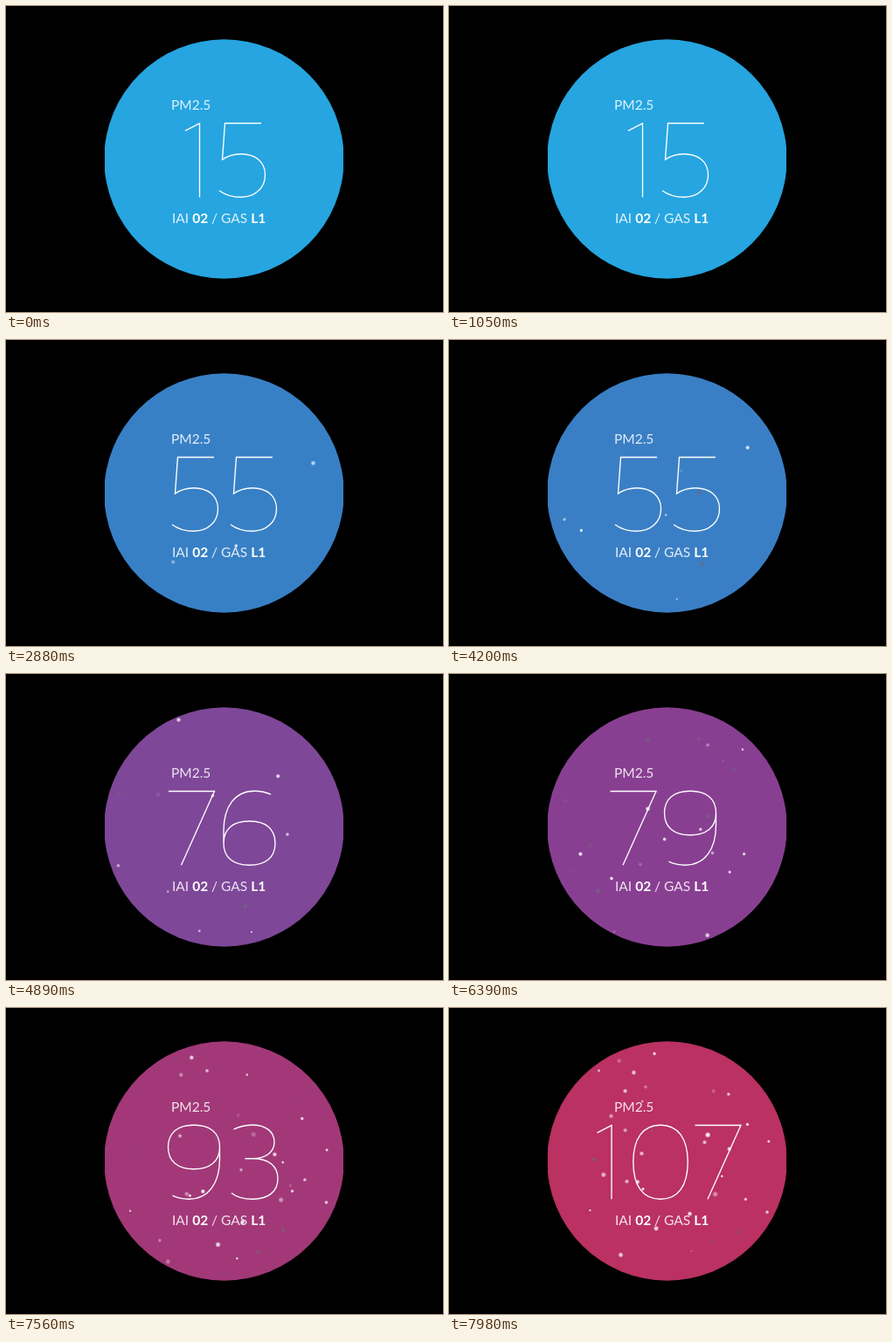
An HTML page with a canvas that plays this animation: 500x351 px, repeating every 8000 ms.

```html
<!DOCTYPE html>
<html lang="en">
<head>
<meta charset="utf-8">
<title>Air quality</title>
<style>
  html, body { margin: 0; width: 100%; height: 100%; overflow: hidden; background: #000; }
  svg, canvas { position: absolute; left: 0; top: 0; width: 500px; height: 351px; }
  text { font: 400 15.5px Lato, "Open Sans", sans-serif; fill: #fff; fill-opacity: .85; }
  .bold { font-weight: 700; fill-opacity: 1; }
  .digits { fill: none; stroke: #fff; stroke-width: 1.35; }
</style>
</head>
<body>
<svg viewBox="0 0 500 351">
  <clipPath id="sides"><rect x="113" y="38" width="273" height="275"/></clipPath>
  <circle id="disc" cx="249.5" cy="175.5" r="137.2" clip-path="url(#sides)"/>
  <text x="189" y="119.3">PM2.5</text>
  <text x="190" y="248.5">IAI <tspan class="bold">02</tspan> / GAS <tspan class="bold">L1</tspan></text>
  <g class="digits" id="reading" role="img">
    <g id="ghost" stroke-opacity=".4"></g>
    <g id="number"></g>
  </g>
</svg>
<canvas width="500" height="351"></canvas>
<script>
const LOOP = 8000;
const $ = id => document.getElementById(id);
const ctx = document.querySelector('canvas').getContext('2d');
const clamp = x => Math.min(1, Math.max(0, x));
const mix = (a, b, k) => a + (b - a) * k;
const noise = n => { const v = Math.sin(n * 127.1) * 43758.5453; return v - Math.floor(v); };

function oval(cx, cy, rx, ry) {
  const hx = rx * .63, hy = ry * .65;
  return `M${cx} ${cy - ry}c${hx} 0 ${rx} ${ry - hy} ${rx} ${ry}s${hx - rx} ${ry} ${-rx} ${ry}` +
    `s${-rx} ${hy - ry} ${-rx} ${-ry}s${rx - hx} ${-ry} ${rx} ${-ry}z`;
}

// Hairline numerals, 85 units tall.
const six = 'M59 4C53 1 46 0 40 0C18 0 5 18 5 46V60' + oval(34.5, 59.75, 29.5, 25.25);
const glyphs = [
  { width: 80, d: oval(40.5, 42.5, 31.2, 42.5) },
  { width: 41, d: 'M9 9L25.5 .5V85' },
  { width: 64, d: 'M7 8C14 2 21 0 29 0C43 0 52 9 52 22C52 33 47 40 36 52L7 84.5H56' },
  { width: 64, d: 'M6 5C13 1.5 20 0 28 0C43 0 52.5 8 52.5 19.5S43 38.5 28 38.5H19H28C46 38.5 56.5 47 56.5 61.5S46 85 28 85C18 85 9 82.5 3.5 78' },
  { width: 70, d: 'M46 85V0L5 62H64' },
  { width: 67, d: 'M55 .3H13.5L10.5 42C17 37.5 24 35.5 32 35.5C48 35.5 59.5 44.5 59.5 59.5S48 85 32 85C22 85 13 82 7 77.5' },
  { width: 70, d: six },
  { width: 58, d: 'M0 .3H52.5L14.5 85' },
  { width: 69, d: oval(33.8, 19.75, 25.5, 19.75) + oval(34, 62.25, 30, 22.75) },
  { width: 73, d: six, turn: 'translate(68 85) rotate(180)' },
];

const counts = [
  { start: 1250, end: 2430, from: 15, to: 55 },
  { start: 4110, end: 5123, from: 55, to: 79 },
  { start: 7110, end: 7980, from: 79, to: 107 },
];

const scale = [
  { level: 15, rgb: [38, 165, 224] },
  { level: 37, rgb: [43, 155, 221] },
  { level: 55, rgb: [56, 128, 198] },
  { level: 79, rgb: [136, 63, 145] },
  { level: 107, rgb: [186, 49, 98] },
];

function valueAt(t) {
  const { start, end, from, to } = counts.findLast(c => t >= c.start) ?? counts[0];
  const k = clamp((t - start) / (end - start));
  return mix(from, to, (1 - Math.cos(Math.PI * k)) / 2);
}

function tintAt(value) {
  const i = Math.max(1, scale.findIndex(s => s.level >= value - 1e-6));
  const a = scale[i - 1], b = scale[i];
  const k = clamp((value - a.level) / (b.level - a.level));
  return `rgb(${a.rgb.map((c, j) => Math.round(mix(c, b.rgb[j], k)))})`;
}

function showNumber(n, sliding) {
  const digits = [...String(n)].map(d => glyphs[d]);
  let pen = 0;
  const strokes = digits.map(({ width, d, turn = '' }) => {
    const path = `<path d="${d}" transform="translate(${pen}) ${turn}"/>`;
    pen += width;
    return path;
  }).join('');
  const place = (layer, left, markup) => {
    layer.innerHTML = markup;
    layer.setAttribute('transform', `translate(${left} 134.2)`);
  };
  const left = 250 - pen / 2;
  place($('number'), sliding ? left - 5 : left, strokes);
  place($('ghost'), left + 1, sliding ? strokes : '');
  $('number').setAttribute('stroke-opacity', sliding ? .8 : 1);
  $('reading').setAttribute('aria-label', n);
}

function speck(x, y, r, color, alpha) {
  const glow = ctx.createRadialGradient(x, y, 0, x, y, r * 1.35);
  glow.addColorStop(0, `rgba(${color},${alpha})`);
  glow.addColorStop(.5, `rgba(${color},${alpha * .85})`);
  glow.addColorStop(1, `rgba(${color},0)`);
  ctx.fillStyle = glow;
  ctx.fillRect(x - 5, y - 5, 10, 10);
}

// Specks are born ever faster, drift straight and fade out.
const LIFE = 1600;
const specks = Array.from({ length: 75 }, (_, i) => {
  const rand = k => noise(i * 7 + k + 1);
  const place = rand(0) * 2 * Math.PI, radius = 132 * Math.sqrt(rand(1));
  const heading = rand(2) * 2 * Math.PI, speed = mix(16, 50, rand(3));
  const grey = rand(4) < .25;
  return {
    birth: LOOP * Math.cbrt((i + .5) / 75),
    x: 249.5 + radius * Math.cos(place), y: 175.5 + radius * Math.sin(place),
    vx: speed * Math.cos(heading), vy: speed * Math.sin(heading),
    r: mix(1.1, 2.6, rand(5)),
    color: grey ? '112,104,124' : '255,255,255',
    alpha: grey ? .7 : mix(.35, 1, Math.sqrt(rand(6))),
  };
});

function drawDust(t) {
  ctx.clearRect(0, 0, 500, 351);
  ctx.save();
  ctx.beginPath();
  ctx.arc(249.5, 175.5, 137, 0, 7);
  ctx.clip();
  for (const { birth, x, y, vx, vy, r, color, alpha } of specks) {
    const age = t - birth;
    if (age < 0 || age > LIFE) continue;
    const drift = (age - LIFE / 2) / 1000;
    const fade = clamp(age / 250) * clamp((LIFE - age) / 350);
    speck(x + vx * drift, y + vy * drift, r, color, alpha * fade);
  }
  ctx.restore();
}

function draw(t) {
  const value = valueAt(t);
  $('disc').setAttribute('fill', tintAt(value));
  showNumber(Math.floor(value + 1e-6), t > counts[0].start && t < counts[0].end);
  drawDust(t);
}

const begin = performance.now();
function tick() {
  draw((performance.now() - begin) % LOOP);
  requestAnimationFrame(tick);
}
tick();
</script>
</body>
</html>
```
